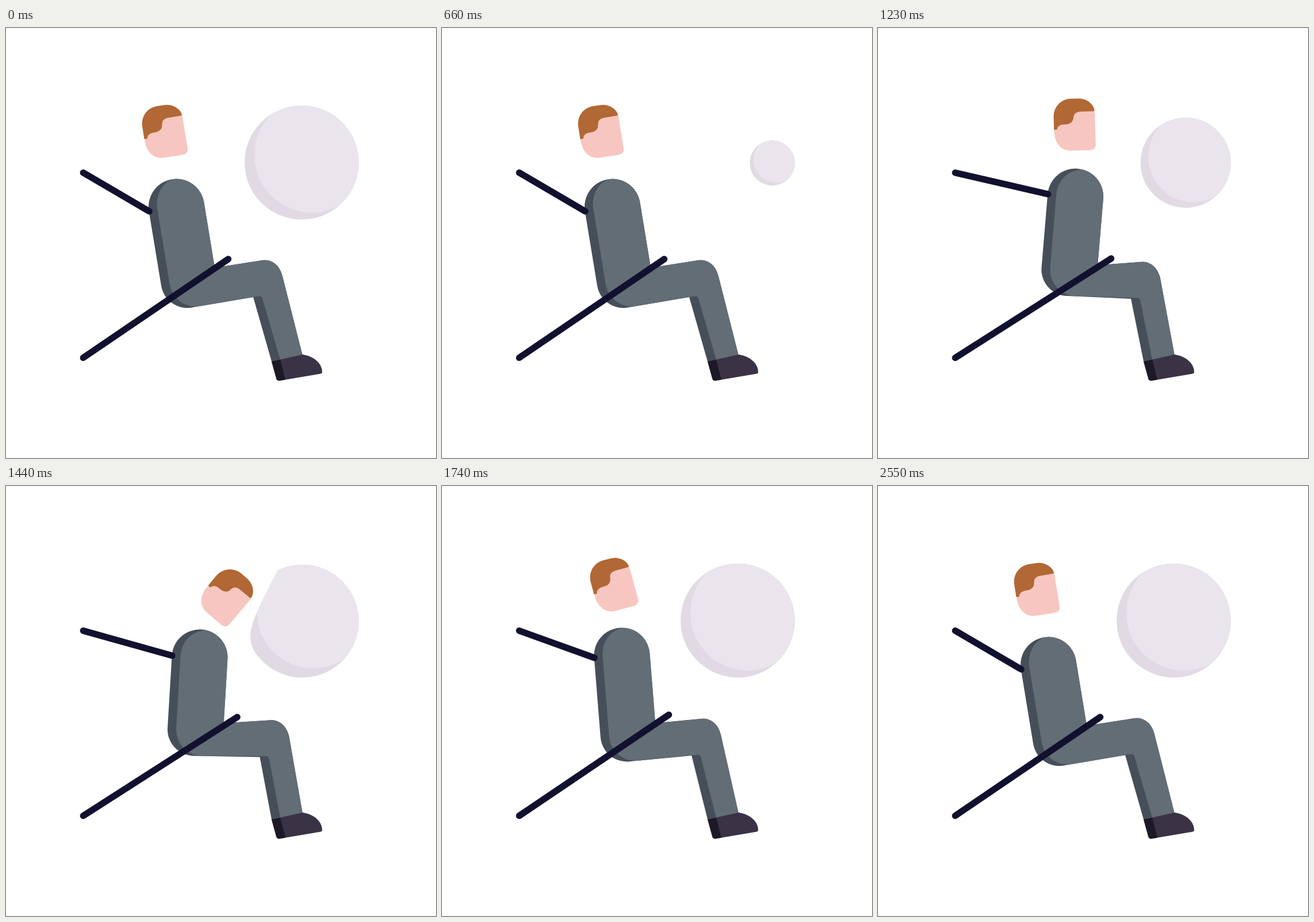
An HTML page with a canvas that plays this animation: 748x748 px, repeating every 4580 ms.

```html
<!DOCTYPE html>
<html lang="en">
<head>
<meta charset="utf-8">
<title>Airbag</title>
<style>
  html, body { margin: 0; width: 100%; height: 100%; overflow: hidden; background: #fff; }
  canvas { display: block; width: 100vw; height: 100vh; }
</style>
</head>
<body>
<canvas id="stage" width="748" height="748"></canvas>
<script>
const ctx = document.getElementById('stage').getContext('2d');
const LOOP = 4580, STEP = 30;
const COLOR = {
  ball: '#eae5ec', ballShade: '#e1dae4', suit: '#636d76', suitShade: '#464f59',
  shoe: '#3a3346', shoeShade: '#1d1826', skin: '#f8c6c0', hair: '#b26834', belt: '#11112f'
};

// Pose: shoulder x y, hip corner x y, knee x y, head x y angle, lap belt y
const REST = [296.5, 311, 277.5, 494, 430, 468, 273, 172.5, 0, 402];
const POSES = [
  [1060, REST],
  [1160, [322, 292, 280, 478, 435.5, 469.5, 312, 156.5, 2, 399]],
  [1230, [343.5, 293, 280.5, 464, 440, 471, 341, 160.5, 7.4, 401]],
  [1440, [337, 298, 278.2, 468.5, 441.5, 471.5, 388.5, 184, 49, 402]],
  [1740, [313, 295, 279.5, 483.6, 434.2, 469, 294.5, 164.5, -6.1, 398]],
  [1980, [297.5, 316, 277.5, 494, 430, 468, 268.5, 180, 1, 404]],
  [2550, REST]
];

const FACE = new Path2D('M241 193C242.5 213 256 229 275 225.5L308 220.5Q317 218 316 210L306.5 151L260 150Z');
const HAIR = new Path2D('M240.5 193L237 171C235 153 246 139 262 136L276 134C290 132 302 140 305.5 149' +
  'Q306.5 152 304 152.5L280 156.5Q271 159 271.5 168Q272 178 262 181L254 182.5Q246 185 246 191Q246 193 243 193Z');
const SHOE = new Path2D('M462 580L516 568C535 571 550 583 550 598Q550 601 547 601.5L476 613.5Q471 614 470 609Z');
const HEEL = new Path2D('M462 580L477 577L486 611.7L476 613.5Q471 614 470 609Z');

const mix = (a, b, k) => a + (b - a) * k;
const ramp = (t, a, b) => Math.min(1, Math.max(0, (t - a) / (b - a)));
const smooth = k => k * k * (3 - 2 * k);

function fill(path, color) {
  ctx.fillStyle = color;
  ctx.fill(path);
}

// Smooth spline through the poses, at rest at both ends
function poseAt(t) {
  const last = POSES.length - 1;
  if (t <= POSES[0][0] || t >= POSES[last][0]) return REST;
  const i = POSES.findIndex(p => p[0] > t) - 1;
  const [t0, a] = POSES[i], [t1, b] = POSES[i + 1];
  const span = t1 - t0, k = (t - t0) / span;
  const slope = (n, j) => n === 0 || n === last ? 0 :
    (POSES[n + 1][1][j] - POSES[n - 1][1][j]) / (POSES[n + 1][0] - POSES[n - 1][0]);
  return a.map((v, j) => mix(v, b[j], smooth(k)) +
    span * k * (1 - k) * ((1 - k) * slope(i, j) - k * slope(i + 1, j)));
}

function ballSize(t) {
  if (t < 1115) {
    const k = t / 1115;
    return 1 - mix(k, smooth(k), 0.3);
  }
  return 1 - (1 - ramp(t, 1115, 1327)) ** 2;
}

function drawBall(t) {
  const size = ballSize(t);
  if (size < 0.005) return;
  const dent = smooth(ramp(t, 1320, 1420)) * (1 - smooth(ramp(t, 1480, 1630)));
  const r = mix(99.25, 98.3, dent) * size, cx = 613.75 - r, cy = 234 + (1 - size) * 1.3 + dent;
  const from = 244 * Math.PI / 180, to = 500 * Math.PI / 180;
  const shell = new Path2D();
  shell.arc(cx, cy, r, from, to);
  shell.bezierCurveTo(
    cx + r * mix(-1.184, -1.073, dent), cy + r * mix(0.145, 0.272, dent),
    cx + r * mix(-1.023, -0.892, dent), cy + r * mix(-0.615, 0.01, dent),
    cx + r * Math.cos(from), cy + r * Math.sin(from));
  shell.closePath();
  fill(shell, COLOR.ballShade);
  ctx.save();
  ctx.clip(shell);
  const light = new Path2D();
  light.arc(cx + size * mix(17.5, 19.5, dent), cy - size * mix(13, 17, dent), r * 1.007, 0, 7);
  fill(light, COLOR.ball);
  ctx.restore();
}

function drawBelt(y, endX, endY) {
  ctx.beginPath();
  ctx.moveTo(134.3, y);
  ctx.lineTo(endX, endY);
  ctx.lineWidth = 11.3;
  ctx.lineCap = 'round';
  ctx.strokeStyle = COLOR.belt;
  ctx.stroke();
}

function drawBody([sx, sy, hx, hy, kx, ky, , , , lapY]) {
  const r = 48.5, bend = 46;
  const g = Math.atan2(hy - sy, hx - sx) + Math.acos(r / Math.hypot(hx - sx, hy - sy));
  const wx = -Math.cos(g), wy = -Math.sin(g);   // across the torso, to the right
  const ux = -wy, uy = wx;                      // down the torso
  const backX = sx - r * wx, backY = sy - r * wy;
  const lapTop = 412.5 + Math.max(0, (hy - 484) * 0.45);
  const lapX = sx + r * wx + ux / uy * (lapTop - sy - r * wy);

  const front = p => {
    p.lineTo(lapX, lapTop);
    p.lineTo(kx + 16, ky - 64);
    p.bezierCurveTo(kx + 33, ky - 66, kx + 46, ky - 55, kx + 50.7, ky - 37);
    p.lineTo(516, 570);
  };

  const whole = new Path2D();
  whole.arc(sx, sy, r, g, g + Math.PI);
  front(whole);
  whole.lineTo(462, 580);
  whole.lineTo(kx, ky);
  whole.arcTo(hx, hy, backX, backY, bend);
  whole.closePath();
  fill(whole, COLOR.suitShade);

  const ix = backX + 15 * wx, iy = backY + 15 * wy;
  const top = g + 1.73;
  const tx = sx + r * Math.cos(top), ty = sy + r * Math.sin(top);
  const light = new Path2D();
  light.moveTo(ix, iy);
  light.bezierCurveTo(ix - 30 * ux, iy - 30 * uy, tx - 20, ty + 1, tx, ty);
  light.arc(sx, sy, r, top, g + Math.PI);
  front(light);
  light.lineTo(477, 577);
  light.lineTo(kx + 16.5, ky + 4);
  light.quadraticCurveTo(kx + 14.5, ky - 2.5, kx + 10, ky - 1.5);
  light.arcTo(hx + 15 * wx, hy + 15 * wy, ix, iy, bend);
  light.closePath();
  fill(light, COLOR.suit);

  fill(SHOE, COLOR.shoe);
  fill(HEEL, COLOR.shoeShade);
  drawBelt(251.7, backX + 0.5, backY);
  drawBelt(573.7, lapX + 23.5, lapY);
}

function drawHead([, , , , , , x, y, angle]) {
  ctx.save();
  ctx.translate(x, y);
  ctx.rotate(angle * Math.PI / 180);
  ctx.translate(-REST[6], -REST[7]);
  fill(FACE, COLOR.skin);
  fill(HAIR, COLOR.hair);
  ctx.restore();
}

function frame() {
  const t = Math.floor(performance.now() % LOOP / STEP) * STEP;
  const pose = poseAt(t);
  ctx.fillStyle = '#fff';
  ctx.fillRect(0, 0, 748, 748);
  drawBall(t);
  drawBody(pose);
  drawHead(pose);
  requestAnimationFrame(frame);
}
frame();
</script>
</body>
</html>
```
